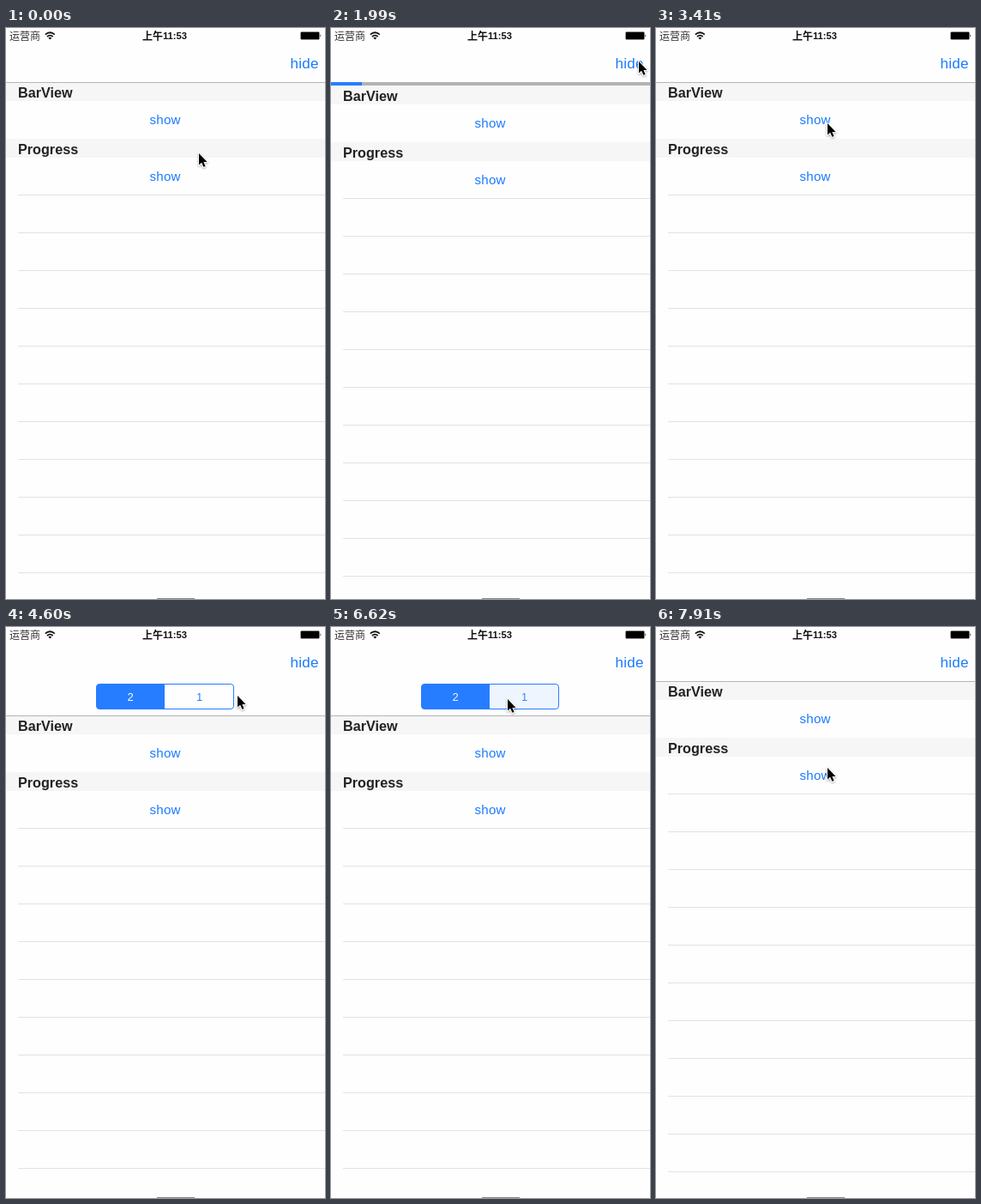
These frames come from a looping animation (372 px wide and 665 px high, 8 s). An HTML page:

```html
<!DOCTYPE html>
<html lang="zh">
<head>
<meta charset="utf-8">
<title>Navigation bar accessories</title>
<style>
  html, body { margin: 0; width: 100%; height: 100%; overflow: hidden; background: #fefefe; }
  svg { display: block; width: 100%; height: 100%; }
  text { font-family: "Liberation Sans", sans-serif; }
  .crisp, #table rect { shape-rendering: crispEdges; }
  .mid { text-anchor: middle; }
  .link { fill: #1a7aff; letter-spacing: .25px; }
  .title { font-size: 16.2px; font-weight: 700; fill: #222; }
  .show { font-size: 15.1px; }
  .cjk { font: 12px "Noto Sans CJK SC", "Noto Sans CJK", sans-serif; }
  .clock { font-weight: 700; fill: #111; }
</style>
</head>
<body>
<svg viewBox="0 0 372 665">
  <defs>
    <clipPath id="pill"><rect x="105.5" y="66.5" width="160" height="29" rx="3.5"/></clipPath>
    <filter id="shade" x="-50%" y="-50%" width="200%" height="200%">
      <feDropShadow dx="0" dy="1" stdDeviation="0.9" flood-opacity="0.4"/>
    </filter>
  </defs>
  <rect width="372" height="665" fill="#fefefe"/>

  <g id="table"></g>
  <rect class="crisp" x="176" y="664" width="44" height="1" fill="#858585"/>

  <text class="cjk" x="4" y="14" fill="#333">运营商</text>
  <g fill="none" stroke="#111" stroke-width="1.7">
    <path d="M45.8 7.6Q51.3 2.9 56.8 7.6M47.9 10Q51.3 7.2 54.7 10"/>
    <path d="M51.3 13.6L49.3 11.5Q51.3 10 53.3 11.5Z" fill="#111" stroke="none"/>
  </g>
  <text class="cjk clock" x="159" y="14">上午</text>
  <text class="clock" x="183" y="13.4" font-size="11.2">11:53</text>
  <rect x="343.5" y="4.5" width="22" height="9" rx="1.5" fill="none" stroke="#909090"/>
  <rect x="344" y="5" width="21" height="8"/>
  <path d="M366.5 7.2Q368.2 9 366.5 10.8Z"/>

  <text id="hide" class="link" x="331.5" y="47" font-size="17">hide</text>
  <rect id="edge" class="crisp" y="63" width="372" height="1" fill="#b5b5b5"/>

  <g id="progress" class="crisp">
    <rect y="63" width="372" height="4" fill="#b3b3b3"/>
    <rect y="63" width="36" height="4" fill="#267dff"/>
  </g>

  <g id="segments">
    <g clip-path="url(#pill)" fill="#267dff">
      <rect id="fillA" x="105" y="66" width="80" height="30"/>
      <rect id="fillB" x="185" y="66" width="81" height="30"/>
    </g>
    <rect x="105.5" y="66.5" width="160" height="29" rx="3.5" fill="none" stroke="#267dff"/>
    <path d="M184.5 67V95" stroke="#267dff"/>
    <text id="labelA" class="mid" x="145" y="85.6" font-size="13">2</text>
    <text id="labelB" class="mid" x="225.5" y="85.6" font-size="13">1</text>
  </g>

  <path id="cursor" filter="url(#shade)" stroke="#fff" stroke-width="1.8" paint-order="stroke" stroke-linejoin="round"
    d="M1 1V14.6L4.1 11.8L6.4 16.8L8.6 15.9L6.4 10.9H10.6Z"/>
</svg>
<script>
const LOOP = 8000;
const BEAT = 118; // the screen refreshes once per beat
const LEAD = 20;

// Beats at which something is triggered.
const LOAD = 10, CLEAR = 23, PICK = 35, CLOSE = 62;
const CHOOSE = 48.8, REVERT = 53.2;

const HOME = { x: 224, y: 145 };
const glides = [
  { from: 0, to: 5, x: 189, y: 175 },
  { from: 11, to: 17, x: 358, y: 38 },
  { from: CLEAR, to: 29, x: 199, y: 110 },
  { from: PICK, to: 43, x: 339, y: 48 },
  { from: 44, to: 49, x: 231, y: 77 },
  { from: 50, to: 53, x: 172, y: 83 },
  { from: 53, to: 56, x: 205, y: 83 },
  { from: 56, to: 60, x: 351, y: 38 },
  { from: CLOSE, to: 67, x: 199, y: 163 }
];

const $ = id => document.getElementById(id);
const set = (id, attr, value) => $(id).setAttribute(attr, value);
const ramp = (beat, from, length) => Math.min(1, Math.max(0, (beat - from) / length));
const ease = k => k * k * (3 - 2 * k);

function pointerAt(beat) {
  let { x, y } = HOME;
  for (const g of glides) {
    const k = ease(ramp(beat, g.from, g.to - g.from));
    x += (g.x - x) * k;
    y += (g.y - y) * k;
  }
  return [Math.round(x), Math.round(y)];
}

// A pressed button dims at once and recovers over four beats.
function press(beat, action) {
  return beat < action - 2 ? 0 : 1 - ramp(beat, action - 1, 4);
}

// White at 0, tint blue at 1.
const tint = k => `rgb(${255 - 217 * k},${255 - 130 * k},255)`;

function section(title, y) {
  return `<rect y="${y}" width="372" height="22" fill="#f6f6f6"/>
    <text class="title" x="14" y="${y + 18}">${title}</text>
    <text class="link show mid" x="185.6" y="${y + 49}">show</text>`;
}

function buildTable() {
  let rows = section("BarView", 63) + section("Progress", 129);
  for (let y = 194; y < 665; y += 44) {
    rows += `<rect x="14" y="${y}" width="358" height="1" fill="#e2e2e3"/>`;
  }
  $("table").innerHTML = rows;
}

function draw(ms) {
  const beat = Math.floor((ms + LEAD) / BEAT);
  const loading = beat >= LOAD && beat < CLEAR;
  const picking = beat >= PICK && beat < CLOSE;
  const drop = loading ? 4 : picking ? 40 : 0;

  set("table", "transform", `translate(0 ${drop})`);
  set("edge", "y", picking ? 103 : 63);
  set("progress", "visibility", loading ? "visible" : "hidden");
  set("segments", "visibility", picking ? "visible" : "hidden");

  const chosen = ramp(beat, CHOOSE, 3) - ramp(beat, REVERT, 3);
  set("fillA", "opacity", 1 - chosen * chosen);
  set("fillB", "opacity", chosen);
  set("labelA", "fill", tint(chosen));
  set("labelB", "fill", tint(1 - chosen));

  set("hide", "opacity", 1 - 0.8 * Math.max(press(beat, CLOSE), press(beat, CLEAR)));
  set("cursor", "transform", `translate(${pointerAt(beat)})`);
}

buildTable();
const start = performance.now();
function tick() {
  draw((performance.now() - start) % LOOP);
  requestAnimationFrame(tick);
}
tick();
</script>
</body>
</html>
```
